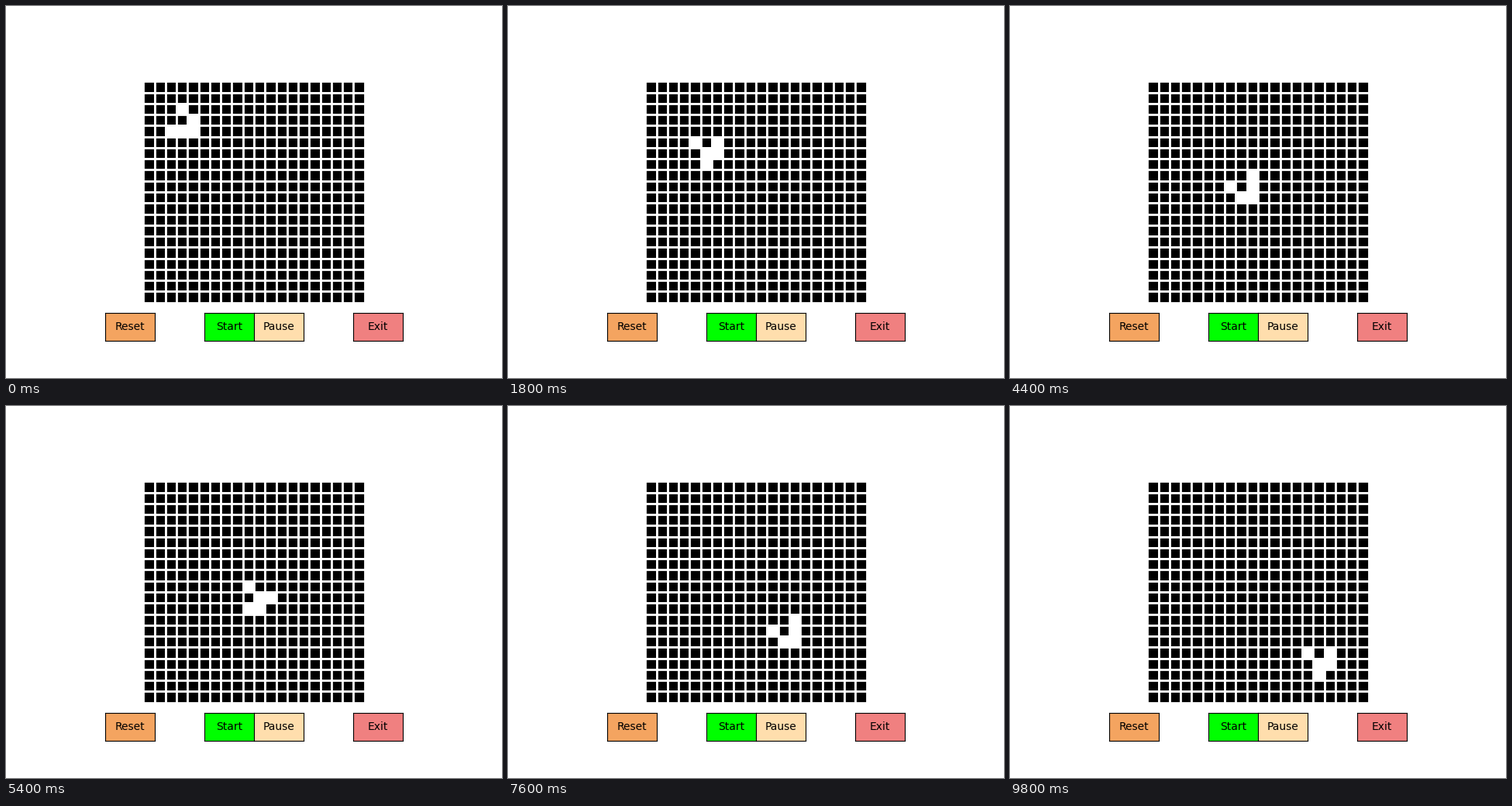
A matplotlib script that plays this animation: 640x480 px, repeating every 10000 ms.

```python
import numpy as np
import matplotlib.pyplot as plt
from matplotlib.animation import FuncAnimation
from matplotlib.collections import PatchCollection
from matplotlib.patches import Rectangle
from matplotlib.widgets import Button

SIZE = 20
FRAMES = 50
INTERVAL = 200
GLIDER = [(2, 3), (3, 4), (4, 2), (4, 3), (4, 4)]


def step(grid):
    """Advance Conway's Game of Life by one generation."""
    near = sum(np.roll(grid, (dy, dx), (0, 1))
               for dy in (-1, 0, 1) for dx in (-1, 0, 1) if dy or dx)
    return ((near == 3) | ((grid == 1) & (near == 2))).astype(int)


def run(cells, count):
    grid = np.zeros((SIZE, SIZE), int)
    for cell in cells:
        grid[cell] = 1
    history = [grid]
    while len(history) < count:
        history.append(step(history[-1]))
    return history


def add_button(left, label, color):
    button = Button(fig.add_axes([left, 0.1, 0.1, 0.075]), label,
                    color=color, hovercolor=color)
    button.label.set_fontsize(10)
    return button


plt.rcParams["font.family"] = "DejaVu Sans"
fig = plt.figure(figsize=(6.4, 4.8), dpi=100, facecolor="white")

ax = fig.add_axes([0.2, 0.2, 0.6, 0.6])
ax.set_aspect("equal")
ax.set_xlim(-0.1, SIZE + 0.1)
ax.set_ylim(SIZE + 0.1, -0.1)
ax.axis("off")

board = PatchCollection(
    [Rectangle((x, y), 1, 1) for y in range(SIZE) for x in range(SIZE)],
    edgecolor="white", linewidth=2)
ax.add_collection(board, autolim=False)

buttons = [add_button(0.2, "Reset", "sandybrown"),
           add_button(0.4, "Start", "lime"),
           add_button(0.5, "Pause", "navajowhite"),
           add_button(0.7, "Exit", "lightcoral")]

history = run(GLIDER, FRAMES)


def update(frame):
    board.set_facecolor(["white" if alive else "black"
                         for alive in history[frame].flat])
    return [board]


anim = FuncAnimation(fig, update, frames=FRAMES, interval=INTERVAL,
                     init_func=lambda: update(0), repeat=True,
                     repeat_delay=0, blit=False)
plt.show()
```
